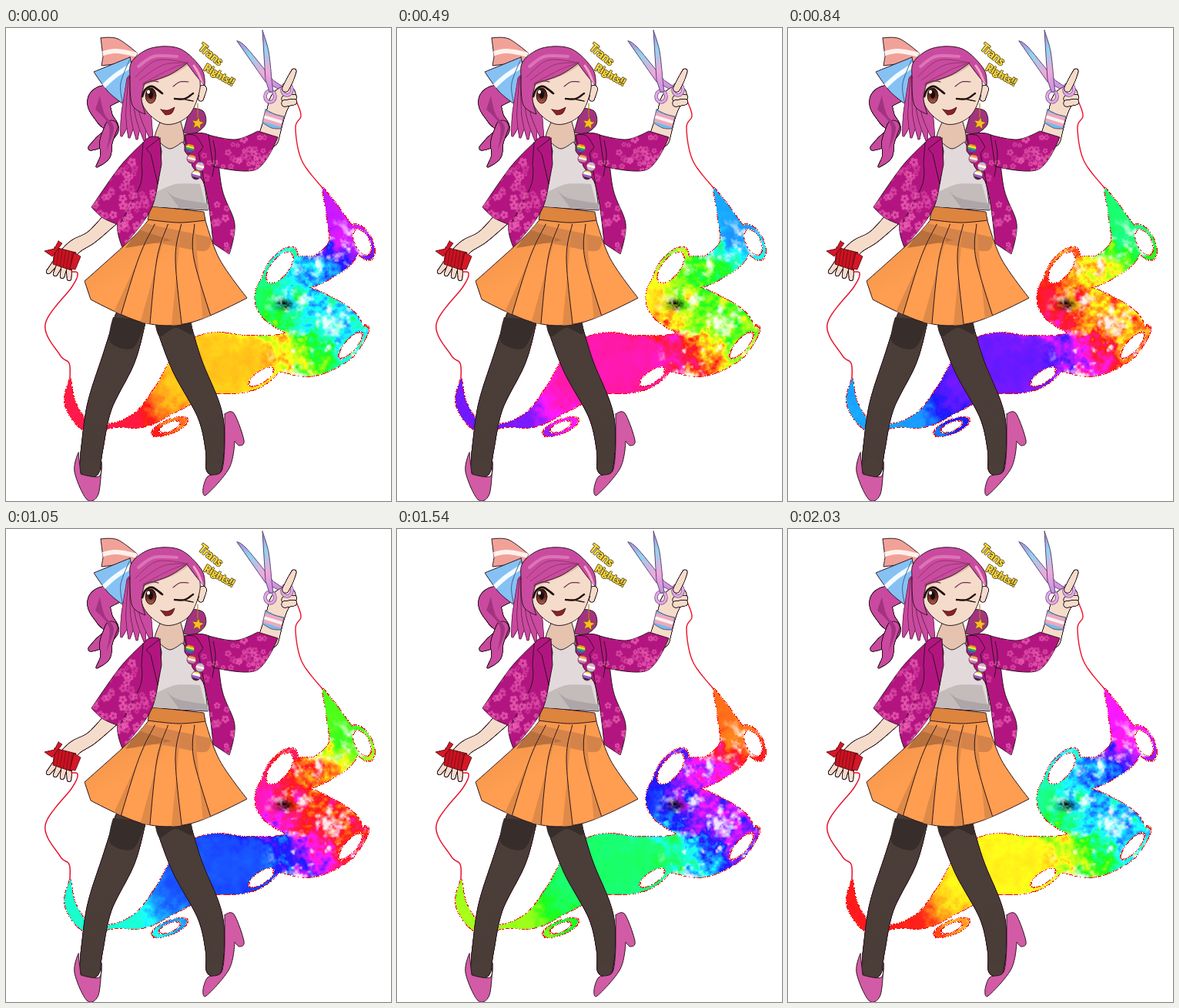
Animation, 500 px wide and 615 px high, one loop 2.1 s. Source, as an HTML page with a canvas:

```html
<!DOCTYPE html>
<html lang="en">
<head>
<meta charset="utf-8">
<title>Rainbow thread</title>
<style>
html, body { margin: 0; width: 100%; height: 100%; overflow: hidden; background: #fff; }
canvas { position: absolute; left: 0; top: 0; }
</style>
</head>
<body>
<canvas id="ribbon" width="500" height="615"></canvas>
<canvas id="figure" width="500" height="615"></canvas>
<script>
const context = id => document.getElementById(id).getContext('2d');
const rib = context('ribbon'), fig = context('figure');
const INK = '#2b141f', SKIN = '#f5dcca', HAIR = '#c94b9f', DEEP = '#a33381', LASH = '#22100f';
const clamp = v => Math.max(0, Math.min(1, v));
const mix = (a, b, t) => a + (b - a) * t;

// Samples a smooth curve through "x,y,..." keys; a trailing * makes a corner.
function curve(text, closed = false, steps = 12) {
  const keys = text.trim().split(/\s+/).map(s => ({ v: s.split(',').map(parseFloat), corner: s.endsWith('*') }));
  const n = keys.length, last = closed ? n : n - 1, out = [];
  const at = i => keys[closed ? (i + n) % n : Math.max(0, Math.min(n - 1, i))];
  const slope = (i, k) => at(i).corner ? 0 : (at(i + 1).v[k] - at(i - 1).v[k]) / 2;
  for (let j = 0; j <= last * steps; j++) {
    const i = Math.min(last - 1, Math.floor(j / steps)), t = j / steps - i, e = t * t * (3 - 2 * t);
    out.push(at(i).v.map((a, k) => mix(a, at(i + 1).v[k], e)
      + slope(i, k) * t * (1 - t) ** 2 - slope(i + 1, k) * t * t * (1 - t)));
  }
  return out;
}

function trace(points, closed) {
  const path = new Path2D();
  curve(points, closed).forEach(([x, y]) => path.lineTo(x, y));
  if (closed) path.closePath();
  return path;
}
function ink(path, color = INK, width = 1) {
  fig.strokeStyle = color;
  fig.lineWidth = width;
  fig.stroke(path);
}
function tint(points, fill) {
  const path = trace(points, true);
  fig.fillStyle = fill;
  fig.fill(path);
  return path;
}
function shape(points, fill, color) {
  const path = tint(points, fill);
  ink(path, color);
  return path;
}
const line = (points, color, width) => ink(trace(points), color, width);

function oval(x, y, rx, ry, fill, color, width) {
  const path = new Path2D();
  path.ellipse(x, y, rx, ry, 0, 0, 7);
  if (fill) { fig.fillStyle = fill; fig.fill(path); }
  if (color) ink(path, color, width);
  return path;
}
// Tapered limb along "x,y,radius" keys.
function tube(points, fill, color = INK) {
  const dots = curve(points, false, 30);
  for (const [grow, paint] of [[0.6, color], [-0.4, fill]])
    dots.forEach(([x, y, r]) => oval(x, y, Math.max(0.3, r + grow), Math.max(0.3, r + grow), paint));
}
function blend(x0, y0, x1, y1, ...colors) {
  const g = fig.createLinearGradient(x0, y0, x1, y1);
  colors.forEach((c, i) => g.addColorStop(i / (colors.length - 1), c));
  return g;
}
function within(path, draw) {
  fig.save();
  fig.clip(path);
  draw();
  fig.restore();
}
function stripes(path, x, y, turn, height, colors) {
  within(path, () => {
    fig.translate(x, y);
    fig.rotate(turn);
    colors.forEach((c, i) => {
      fig.fillStyle = c;
      fig.fillRect(-30, (i - colors.length / 2) * height, 60, height + 0.3);
    });
  });
}

let seed = 7;
const random = () => (seed = seed * 16807 % 2147483647) / 2147483647;
function flowers(path, x, y, w, h, count) {
  within(path, () => {
    for (let i = 0; i < count; i++) {
      const cx = x + random() * w, cy = y + random() * h, r = 1.8 + random() * 2, turn = random() * 6;
      fig.globalAlpha = 0.35 + random() * 0.5;
      for (let a = 0; a < 6.2; a += Math.PI * 0.4)
        oval(cx + Math.cos(a + turn) * r, cy + Math.sin(a + turn) * r, r * 0.65, r * 0.65, '#e75caf');
    }
  });
}

function drawLegs() {
  const hose = '#4b3e39', dark = '#372d2a', shoe = '#d25ba5';
  tube('161,380,20 147,428,21 122,490,16 112,545,14 109,572,13', hose);
  tube('217,385,22 235,438,20 264,500,16 271,545,12 270,572,10', hose);
  tint('139,376* 135,408 165,416 181,380*', dark);
  tint('194,386* 200,401 220,390 241,398 240,380*', dark);
  shape('94,552* 89,577 105,613 120,606 124,564* 121,583 97,580*', shoe);
  shape('284,502* 296,501 309,536 303,543 297,537* 290,572 260,607 256,598* 262,583 280,576 284,540*', shoe);
}

function drawSkirt() {
  const skirt = shape('186,248* 163,274 102,329* 110,353* 178,383 240,383 313,351* 277,300 258,247*',
    blend(150, 250, 215, 390, '#f0934a', '#ff9e50', '#ff9d51'));
  within(skirt, () => {
    tint('180,254* 162,278* 205,281 258,290 266,272*', '#d4844a');
    tint('172,262* 155,286* 215,276*', '#b8703c');
    for (let i = 1; i < 5; i++) {
      const t = i / 5, top = mix(176, 262, t), foot = mix(102, 313, t), bend = mix(148, 268, t);
      tint(`${top},255* ${bend},300 ${foot},390* ${foot - 14},390*`, '#e08a48');
      line(`${top},255 ${bend},300 ${foot},390`);
    }
  });
  shape('188,231* 222,235 257,239* 259,250* 224,253 184,249*', '#dd843e');
}

function drawTorso() {
  shape('201,121* 193,147 214,162 231,147 226,119*', '#e6c3af');
  shape('199,148* 213,157 229,148* 254,190 262,237* 225,235 188,232*', '#e2dada');
  tint('194,214* 220,203 252,203* 261,236* 189,232*', '#c4bbbb');
  tint('206,208* 222,221 262,228* 262,236* 225,234*', '#ada5a7');
}

function drawJacket() {
  const cloth = '#b31580';
  const left = shape('198,142* 178,150 164,218 145,255 151,285* 190,232 202,160*', cloth);
  const right = shape('232,139* 268,143 281,211 297,255 290,294* 269,280* 258,205 232,160*', cloth);
  const sleeve = shape('178,149* 148,180 111,233* 126,247 147,256* 174,205 176,177*', cloth);
  const arm = shape('263,139* 298,145 327,134* 353,142* 325,184 269,180*', cloth);
  flowers(left, 143, 205, 53, 76, 45);
  flowers(right, 257, 165, 42, 130, 20);
  flowers(sleeve, 112, 165, 64, 90, 45);
  flowers(arm, 280, 138, 66, 50, 38);
  shape('200,143* 182,157* 188,164* 197,203* 202,177*', cloth);
  shape('232,139* 246,140 256,155* 250,163* 258,202* 242,180*', cloth);
  line('269,146 272,166 268,193');
  const pins = [
    [239, 156, '#d82032 #f28b25 #f5df39 #31a84b #315cc0 #86369b'],
    [241, 170, '#d85132 #f3a467 #faf5ee #d07bb0 #a23773'],
    [252, 180, '#79c9ec #f2a7bc #fff #f2a7bc #79c9ec'],
    [247, 191, '#f2df48 #fff #a15bc0 #30272f']
  ];
  for (const [x, y, text] of pins) {
    const dot = oval(x, y, 6, 6, '#fff'), colors = text.split(' ');
    stripes(dot, x, y, 0.25, 13 / colors.length, colors);
    ink(dot, '#67204f', 0.8);
  }
}

function drawLeftHand() {
  tube('138,246,10 112,271,8 90,284,9 76,299,10', SKIN);
  for (let i = 0; i < 4; i++)
    tube(`${67 + i * 5},${302 + i},4 ${55 + i * 9},${317 + i * 3},2.5`, SKIN);
  const spool = shape('63,285* 91,292* 85,315* 61,307*', '#cb1221', '#5d0712');
  within(spool, () => {
    for (let x = 62; x < 95; x += 4.5) line(`${x + 3},284 ${x - 2},316`, '#801018');
  });
  shape('68,277* 73,280* 60,297* 50,290* 63,287*', '#d61726', '#5d0712');
  shape('88,292* 97,297* 90,314* 83,313*', '#d61726', '#5d0712');
  line('85,317 93,319 86,336 51,385 70,425 82,436 83,456', '#e8122b', 1.5);
}

function drawRightHand() {
  line('377,95 383,114 376,130 384,172 411,208', '#ef1026', 1.4);
  tube('341,143,13 350,112,12 356,95,13 364,87,12', SKIN);
  for (let i = 0; i < 2; i++) tube(`362,${92 + i * 6},4 374,${90 + i * 6},3.5`, SKIN);
  const band = trace('337,106* 349,112 361,115* 357,131* 345,130 333,123*', true);
  stripes(band, 347, 119, 0.3, 4.2, ['#72bcec', '#f0a7bb', '#f7f2f4', '#f0a7bb', '#72bcec']);
  ink(band, '#5c4668');
  const steel = blend(315, 5, 345, 85, '#b970d6', '#8fd5f0', '#f0a8dc', '#c48be4');
  for (const [x, y] of [[343, 89], [365, 80]]) {
    oval(x, y, 6.5, 7.5, null, '#80558e', 4.6);
    oval(x, y, 6.5, 7.5, null, '#e0aae8', 3);
  }
  shape('300,17* 312,25 347,68* 359,76* 353,79* 337,70*', steel, '#57456c');
  shape('333,3* 341,30 345,67* 347,83* 342,83* 337,67*', steel, '#57456c');
  tube('363,79,4 369,67,4 374,56,2.8', SKIN);
}

function drawBackHair() {
  tube('152,82,10 122,93,15 127,115,11 138,132,8 122,148,7 110,156,3', HAIR);
  tube('137,128,8 130,148,8 129,166,6 118,180,1', HAIR);
  tint('122,88* 128,112 140,130 130,160* 134,128 116,106*', DEEP);
  shape('239,104* 256,108 259,125 245,137 230,136*', DEEP);
  const pink = shape('123,13* 145,14 171,33* 164,44* 124,49* 126,37*', '#f1a298');
  within(pink, () => line('117,36 142,30 176,36', '#fff0eb', 6));
  const blue = shape('161,38* 114,57* 132,82 151,98* 166,62*', '#86c1f4');
  within(blue, () => line('120,82 142,62 170,44', '#f2fbff', 6));
  line('160,42 149,72 151,96', '#39618d');
  for (let i = 0; i < 5; i++)
    tube(`${165 + i * 2},68,8 ${157 + i * 6},112,7 ${150 + i * 10},${140 + i * 2},1`, HAIR, '#7c285f');
}

function drawHead() {
  tube('250,84,3 256,79,4 253,92,3', SKIN);
  shape('174,60* 178,101 206,125 237,114 252,78 247,47* 211,37*', SKIN);
  tint('176,76* 216,61 239,47* 211,38*', '#dfbaa7');
  const cap = shape('161,65 164,43 189,26 226,27 254,53 258,75* 247,62 235,46* 212,61 180,72* 176,92 181,112* 164,100', HAIR);
  within(cap, () => {
    line('172,50 192,37 222,37', '#dc74b6', 4);
    line('244,49 250,59 255,72', '#f1a0ca', 3);
    for (let i = 0; i < 3; i++)
      line(`236,45 ${212 - i * 8},${54 - i * 6} ${178 - i * 5},${72 - i * 4}`, '#91346f');
  });
}

function drawFace() {
  oval(188, 88, 8.5, 10, '#fff8f3');
  oval(188, 88, 7, 10, blend(189, 78, 189, 98, '#281411', '#67281f', '#b25f4b'), '#32150f');
  oval(188, 87, 3, 5, '#190d0d');
  oval(185, 83, 2, 2.5, '#fff');
  line('177,89 181,80 190,76 203,85', LASH, 2.8);
  line('219,92 232,92 243,85', LASH, 2.4);
  line('233,93 243,95', LASH, 1.4);
  line('178,74 188,69 198,70', '#6c2c50', 1.2);
  line('217,76 226,70 237,70', '#6c2c50', 1.2);
  shape('201,106* 210,107 219,103* 215,111 207,113*', '#8f2028', '#421217');
  line('249,98 249,116', '#b78416', 1.2);
  const star = new Path2D();
  for (let i = 0; i < 10; i++) {
    const a = i * Math.PI / 5 - 1.4, r = i % 2 ? 3.8 : 8.5;
    star.lineTo(249 + Math.cos(a) * r, 124 + Math.sin(a) * r);
  }
  star.closePath();
  fig.fillStyle = '#ffbd24';
  fig.fill(star);
  ink(star, '#795015', 0.8);
}

function word(text, x, y, angle, size) {
  fig.save();
  fig.translate(x, y);
  fig.rotate(angle);
  fig.font = `bold ${size}px Lato, sans-serif`;
  fig.strokeStyle = '#4a3810';
  fig.lineWidth = 2;
  fig.strokeText(text, 0, 0);
  fig.fillStyle = fig.strokeStyle = '#ffe040';
  fig.lineWidth = 0.5;
  fig.fillText(text, 0, 0);
  fig.strokeText(text, 0, 0);
  fig.restore();
}

fig.lineJoin = fig.lineCap = 'round';
drawLegs();
drawSkirt();
drawBackHair();
drawTorso();
drawLeftHand();
drawRightHand();
drawJacket();
drawHead();
drawFace();
word('Trans', 249, 27, 0.68, 15);
word('Rights!!', 256, 54, 0.52, 13);

const hash = (x, y) => { const v = Math.sin(x * 127.1 + y * 311.7) * 43758.5453; return v - Math.floor(v); };
function noise(x, y) {
  const i = Math.floor(x), j = Math.floor(y), ease = t => t * t * (3 - 2 * t), u = ease(x - i);
  return mix(mix(hash(i, j), hash(i + 1, j), u), mix(hash(i, j + 1), hash(i + 1, j + 1), u), ease(y - j));
}
const cloud = (x, y) => noise(x, y) * 0.55 + noise(x * 2.1, y * 2.1) * 0.3 + noise(x * 4.3, y * 4.3) * 0.15;

// Ribbon spine: x, y, half width, hue.
const spine = curve(`83,456,1,-12 83,488,7,-12 105,518,6,-12 140,516,3,-10 178,506,12,-6 212,478,22,42
  258,438,38,45 305,436,37,45 350,423,24,50 395,420,32,100 432,397,32,175 395,374,34,178
  352,352,29,135 372,322,24,180 408,312,18,200 438,284,20,285 427,245,11,286 411,208,1,286`);
// Loops at its rim: centre, half axes, turn.
const loops = [[355, 311, 25, 12, -0.9], [462, 278, 19, 10, 1.1], [447, 412, 23, 8, -0.85],
  [331, 453, 20, 8, -0.6], [212, 518, 16, 6, -0.4]];

// Signed distance to the ribbon's edge, negative inside.
function distance(x, y) {
  let d = Infinity;
  for (const [sx, sy, r] of spine) d = Math.min(d, Math.sqrt((x - sx) ** 2 + (y - sy) ** 2) - r);
  for (const [cx, cy, rx, ry, turn] of loops) {
    const c = Math.cos(turn), s = Math.sin(turn), u = (x - cx) * c + (y - cy) * s, v = (y - cy) * c - (x - cx) * s;
    const e = (Math.hypot(u / rx, v / ry) - 1) * ry;
    d = Math.max(Math.min(d, e - 3), -e);
  }
  return d;
}
function spineHue(x, y) {
  let sum = 0, total = 0;
  for (const [sx, sy, , h] of spine) {
    const w = 1 / (((x - sx) ** 2 + (y - sy) ** 2) ** 2 + 1);
    sum += w * h;
    total += w;
  }
  return sum / total;
}

const X = 72, Y = 204, W = 410, H = 332, image = rib.createImageData(W, H), cells = [];
for (let i = 0; i < W * H; i++) {
  const x = X + i % W, y = Y + Math.floor(i / W), d = distance(x, y);
  if (d >= 1) continue;
  image.data[i * 4 + 3] = 255;
  if (d >= 0) {
    if (hash(x, y) < 0.6) image.data[i * 4] = 238;
    else image.data[i * 4 + 3] = 0;
    continue;
  }
  const busy = clamp((x - 325) / 40), violet = clamp((x + (300 - y) * 0.8 - 405) / 25);
  const warp = n => (cloud(x / 10 + n, y / 10) - 0.5) * 40;
  const white = clamp((cloud(x / 11 + 30, y / 11 + 30) - 0.56) * 4) * busy * clamp((y - 240) / 30);
  const soot = Math.exp(-(((x - 361) / 10) ** 2) - ((y - 359) / 6) ** 2);
  cells.push({
    at: i * 4,
    hue: spineHue(x + warp(0), y + warp(50)) + (cloud(x / 9, y / 9 + 90) - 0.5) * (8 + 95 * busy * (1 - violet)),
    sat: 0.9 - white * 0.8,
    val: 1 - clamp(soot * cloud(x / 3, y / 3) * 1.6)
  });
}

// The whole ribbon turns 12 degrees of hue per step.
function drawRibbon(step) {
  for (const { at, hue, sat, val } of cells) {
    for (let c = 0; c < 3; c++) {
      const k = ((hue - step * 12 + 720) / 60 + 5 - c * 2) % 6;
      image.data[at + c] = 255 * val * (1 - sat * clamp(Math.min(k, 4 - k)));
    }
  }
  rib.putImageData(image, X, Y);
}

let shown = -1;
function tick() {
  const step = Math.floor(performance.now() / 70) % 30;
  if (step !== shown) drawRibbon(shown = step);
  requestAnimationFrame(tick);
}
tick();
</script>
</body>
</html>
```
